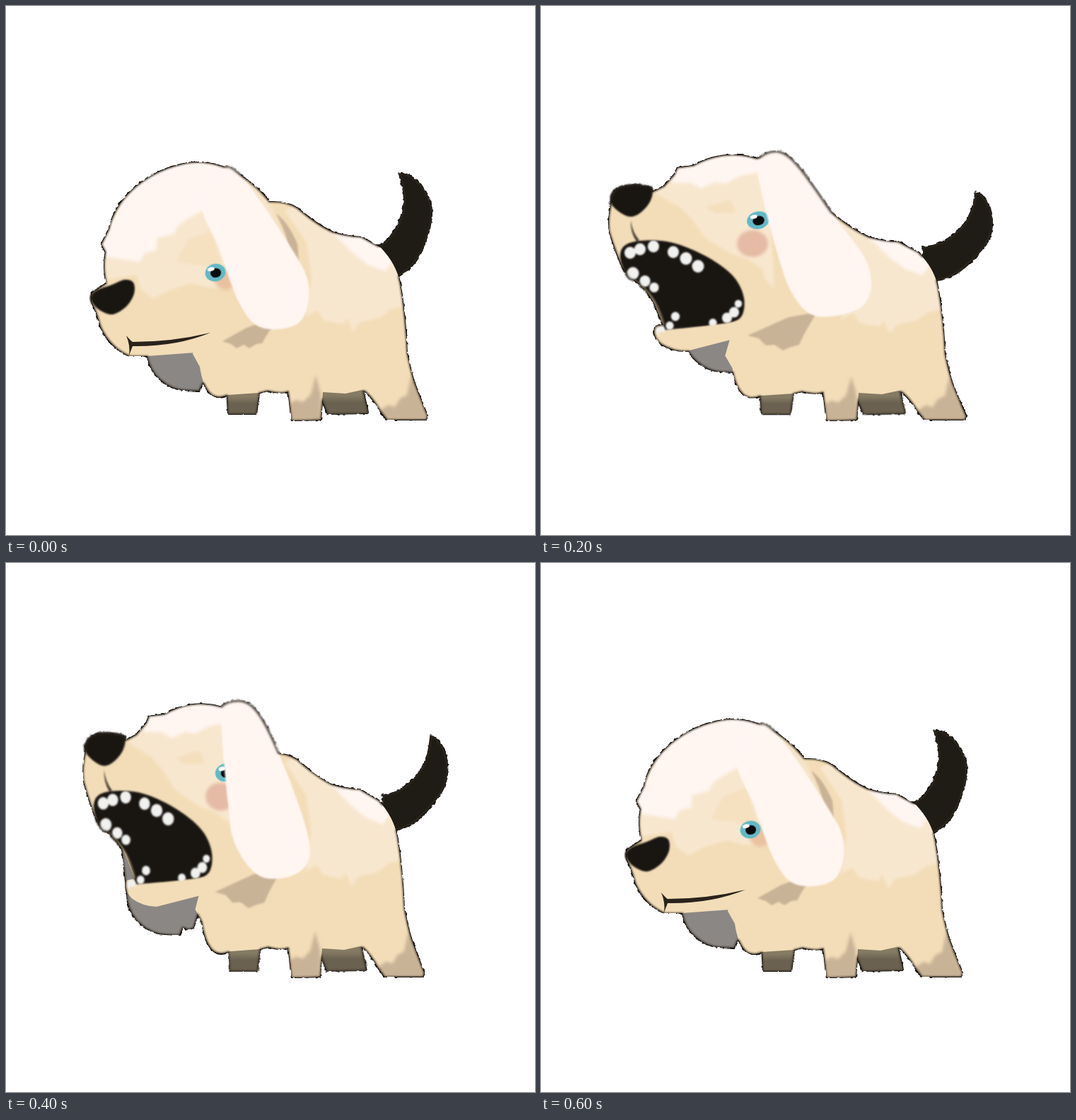
An HTML page for the animation above (650 ms loop, 748 by 748 pixels).

```html
<!DOCTYPE html>
<html lang="en">
<head>
<meta charset="utf-8">
<title>Barking puppy</title>
<style>
  html, body { margin: 0; width: 100%; height: 100%; overflow: hidden; background: #fff; }
  svg { display: block; width: 100vw; height: 100vh; }
</style>
</head>
<body>
<svg id="stage" viewBox="0 0 748 748" xmlns="http://www.w3.org/2000/svg"></svg>
<script>
const TAN = '#f3ddb8', CREAM = '#f8e7cf', WHITE = '#fff6f2', SHADE = '#c9b397', INK = '#191511';
const STEP = 50, STEPS = 13;

const nums = s => s.match(/-?[\d.]+/g).map(Number);

// Closed smooth curve through the points; a repeated point makes a corner.
function curve(list) {
  const v = nums(list), n = v.length / 2;
  const at = i => { const j = (i + n) % n; return [v[2 * j], v[2 * j + 1]]; };
  let d = 'M' + at(0);
  for (let i = 0; i < n; i++) {
    const [a, b, c, e] = [at(i - 1), at(i), at(i + 1), at(i + 2)];
    const h1 = b.map((q, k) => q + (c[k] - a[k]) / 6);
    const h2 = c.map((q, k) => q - (e[k] - b[k]) / 6);
    d += `C${h1} ${h2} ${c}`;
  }
  return d + 'Z';
}

const path = (d, fill, more = '') => `<path d="${d}" fill="${fill}" ${more}/>`;
const blob = (list, fill, more) => path(curve(list), fill, more);
const oval = (x, y, rx, ry, fill, more = '') =>
  `<ellipse cx="${x}" cy="${y}" rx="${rx}" ry="${ry}" fill="${fill}" ${more}/>`;
const teeth = list => {
  const v = nums(list);
  let out = '';
  for (let i = 0; i < v.length; i += 3) out += oval(v[i], v[i + 1], v[i + 2] * .95, v[i + 2], '#f1f1f0');
  return `<g filter="url(#soft1)">${out}</g>`;
};

// A filled shape with soft colour patches kept inside it.
const part = (id, d, fill, patches) =>
  `<clipPath id="clip-${id}"><path d="${d}"/></clipPath>${path(d, fill)}
   <g clip-path="url(#clip-${id})"><g filter="url(#soft2)">${patches}</g></g>`;

const eye = (x, y, rx, ry) => `<g transform="rotate(-12 ${x} ${y})" filter="url(#soft05)">
  ${oval(x, y, rx, ry, '#62b9c6')}${oval(x + .5, y + .5, rx * .52, 6.6, '#0b0b0b')}
  ${oval(x - 5, y - 6, 5, 2.8, '#fff')}</g>`;

const bodyShape = `M350 290L372 277Q398 276 412 286Q440 310 462 320Q482 326 503 327Q515 334 530 342
  Q552 365 557 392Q565 440 567 490Q572 515 577 532Q583 548 596 580L594 585L539 585L529 572
  Q520 556 508 545L503 543L480 548L448 546L445 585L404 586L401 560L399 545Q390 549 370 544L358 547
  L313 550Q300 556 290 549Q278 538 274 510L264 492L270 470L330 350Z`;

const tail = blob(`556,238 556,238 566,238 584,250 597,270 602,292 598,318 586,350 572,369 554,383
  554,383 536,362 526,341 526,341 542,328 555,307 562,285 562,262`, '#1f1c16');

const farLegs = path('M312 540L314 577L354 577L359 540Z', 'url(#leg)') +
  path('M444 536L448 560L455 577L512 576L511 570L503 536Z', 'url(#leg)');

const body = part('body', bodyShape, TAN,
  path(`M395 290L425 335L432 385L424 440L440 430L450 445L478 450L482 440L491 461L500 447L528 441
    L545 428L570 424L560 340L503 320L410 280Z`, CREAM) +
  path('M458 316L503 325L535 340L546 362L536 375L512 366L490 349Z', WHITE) +
  path('M438 522L445 548L446 588L402 588L400 563L410 557L420 560L431 549Z', SHADE) +
  path('M573 522L580 540L600 588L536 588L528 572L541 564L550 567L557 555L567 550Z', SHADE));

const backEar = path(`M165 365Q162 400 167 430L172 478Q176 498 190 510Q205 524 225 525L245 526
  L250 515L257 518L265 516L270 500L280 440Z`, '#8b8785');

const closedShape = `M376 281C350 248 315 222 272 221C225 222 160 255 146 315L135 337L141 348
  Q137 370 142 392L122 406L121 418Q128 432 134 454Q148 484 175 495L200 495L268 490Q335 480 370 455
  Q405 425 406 380Q408 340 385 297Z`;

const closedHead = part('closed', closedShape, TAN,
  path(`M135 345L215 325L285 268L310 250L330 400L285 398L262 392L230 402L208 414L190 400L185 380L135 388Z`, CREAM) +
  path('M240 362L258 330L290 318L310 380L275 366Z', '#f5e0bf') +
  path(`M330 215L372 277L400 340L340 300Z`, '#f6e4c9') +
  path(`M125 352L190 362L196 349L212 346L214 328L238 322L242 312L258 300L280 288L330 300L372 297
    L322 228L330 215L200 200Z`, WHITE)) +
  `<g filter="url(#soft1)">
    ${oval(311, 385, 17, 16, '#e4b591', 'opacity=".75" filter="url(#soft2)"')}
    ${path('M306 474L318 478L326 484L336 479L344 484L354 478L362 477L372 460L388 438L340 455Z', SHADE)}
    ${path('M382 294Q398 304 412 336Q416 365 410 396L402 394Q408 340 382 294Z', SHADE)}
    ${blob('120,411 128,402 150,394 168,387 180,391 181,407 170,425 151,436 134,431 123,421', INK)}
  </g>` + eye(296, 377, 14.5, 12.5);

const calmMouth = `<g id="calm" filter="url(#soft05)">
  ${path('M170 466Q176 473 179 475Q235 475 289 462Q240 482 179 481L174 494Q176 480 170 466Z', '#2a231c')}</g>`;

const snarlMouth = `<g id="snarl" transform="rotate(-2.2 296 377) translate(0 3)">
  <g filter="url(#soft1)">
    ${blob('155,475 155,475 180,466 204,452 220,436 240,419 265,409 290,407 303,417 304,432 290,443 250,455 210,468 172,475', INK)}
    ${path('M155 449Q162 461 175 467L166 470Q158 462 155 449Z', '#3a3127')}
  </g>
  ${teeth(`195 464 5 211 460 7 223 447 6 229 459 5 242 432 8.5 243 450 9 265 421 10
    263 443 8 279 428 4 291 418 9.5 284 438 9`)}</g>`;

const openShape = `M320 214L305 216Q280 208 255 212Q235 215 215 226L193 229L189 238L174 255L158 263
  L100 278Q94 300 97 320Q103 340 112 362Q118 378 140 393Q158 410 166 435L173 451L162 453Q156 466 170 478
  Q185 488 206 488L268 472Q330 482 385 435L365 320L345 240Z`;

const openHead = part('open', openShape, TAN,
  path(`M180 240L320 225L330 400L316 385L314 372L290 357L268 350L232 328L214 302L196 284L160 264Z`, CREAM) +
  path('M232 284L268 274L276 292L246 293Z', '#f3dfbd') +
  path(`M185 250L212 250L226 258L246 249L262 251L282 240L304 236L330 220L280 195L190 215Z`, WHITE) +
  oval(299, 336, 22, 19, '#e6bba5')) +
  `<g filter="url(#soft1)">
    ${path('M292 466L308 470L318 480L330 479L342 487L354 482L365 479L372 464L390 433L350 440Z', SHADE)}
    ${path('M127 303Q129 320 139 331L135 333Q126 320 127 303Z', '#4a4034')}
    ${blob('99,279 101,265 112,256 132,253 150,255 158,260 154,277 141,292 127,298 112,292', INK)}
    ${blob(`112,355 118,339 140,332 178,333 215,345 250,364 275,386 287,413 284,438 266,449 240,452
      174,458 174,458 170,442 156,410 140,393 120,378`, INK)}
    ${path('M140 394Q164 412 174 450', 'none', 'stroke="#76694f" stroke-width="2"')}
  </g>` +
  teeth(`126 349 8.5 140 344 8.5 159 340 8.5 187 348 8.5 205 357 9 222 368 9
    130 378 9 147 389 8 160 398 7 169 459 7 182 452 6 190 439 6.5`) +
  teeth('243 448 6 263 441 7.5 273 433 7.5 279 421 5.5') +
  path('M164 462Q215 456 284 445L268 470L210 484L175 476Z', TAN, 'filter="url(#soft1)"') +
  eye(307, 303, 16, 12.5);

const blur = (id, s) => `<filter id="${id}" x="-20%" y="-20%" width="140%" height="140%"
  color-interpolation-filters="sRGB"><feGaussianBlur stdDeviation="${s}"/></filter>`;

const stage = document.getElementById('stage');
stage.innerHTML = `<defs>
  ${blur('soft05', .6)}${blur('soft1', 1)}${blur('soft2', 2)}
  <linearGradient id="leg" x1="0" y1="0" x2="0" y2="1">
    <stop offset=".35" stop-color="#857b64"/><stop offset=".6" stop-color="#6a6150"/>
  </linearGradient>
  <filter id="edge" filterUnits="userSpaceOnUse" x="0" y="0" width="748" height="748"
    color-interpolation-filters="sRGB">
    <feMorphology in="SourceAlpha" operator="dilate" radius="1" result="wide"/>
    <feTurbulence type="fractalNoise" baseFrequency=".16" numOctaves="2" seed="4" result="noise"/>
    <feDisplacementMap in="wide" in2="noise" scale="4" xChannelSelector="R" yChannelSelector="G" result="rough"/>
    <feFlood flood-color="#17130f"/><feComposite in2="rough" operator="in" result="line"/>
    <feMorphology in="SourceAlpha" operator="erode" radius="1"/>
    <feGaussianBlur stdDeviation="1.2" result="core"/>
    <feFlood flood-color="#3a3024" flood-opacity=".75"/>
    <feComposite in2="SourceAlpha" operator="in"/>
    <feComposite in2="core" operator="out" result="rim"/>
    <feMerge><feMergeNode in="line"/><feMergeNode in="SourceGraphic"/><feMergeNode in="rim"/></feMerge>
  </filter></defs>
  <g filter="url(#edge)">
    <g id="rear"><g id="tail">${tail}</g>${farLegs}</g>
    <g id="backEar" filter="url(#soft05)">${backEar}</g>
    <g id="body">${body}</g>
    <g id="closed">${closedHead}${calmMouth}${snarlMouth}</g>
    <g id="open">${openHead}</g>
    <path id="ear" fill="${WHITE}" filter="url(#soft1)"/>
  </g>`;

// One key every two steps; the last key equals the first.
const still = '1 0 0 1 0 0';
const keys = {
  squash: ['0', '.012', '.026', '0', '-.025', '-.011', '0'],
  wag: ['0', '9', '26', '35', '24', '8', '0'],
  backEar: ['28 18', '37 1', '30 -8', '12 -11', '0 0', '6 17', '28 18'],
  closed: [still, '.999 .038 -.038 .999 14.6 -13.9', '.996 .087 -.087 .996 30.9 -36.4',
    still, still, '1 .026 -.026 1 11.8 -15.7', still],
  open: [still, still, still, '.964 .0245 -.031 1.022 23 -26.2',
    '.957 .023 -.008 1.0385 19.7 -25.5', '.957 .023 -.008 1.0385 19.7 -17', still],
  ear: [
    '300,235 277,282 300,340 330,420 362,455 415,447 428,395 400,337 330,238',
    '298,232 285,275 310,345 342,412 380,446 440,431 444,375 412,318 335,242',
    '308,216 310,255 333,345 356,408 392,439 456,423 463,368 415,298 350,213',
    '313,206 313,245 324,340 340,408 374,442 433,430 443,382 400,280 352,203',
    '306,202 305,240 314,340 325,400 362,444 416,436 428,390 386,270 347,202',
    '296,232 284,285 292,350 308,428 355,461 400,446 407,396 370,310 325,235'
  ]
};
keys.ear.push(keys.ear[0]);

function pose(name, step) {
  const i = step >> 1, f = (step % 2) / 2;
  const a = nums(keys[name][i]);
  if (!f) return a;
  const b = nums(keys[name][i + 1]);
  return a.map((v, k) => v + (b[k] - v) * f);
}

const el = id => document.getElementById(id);
const move = (id, t) => el(id).setAttribute('transform', t);
const show = (id, on) => el(id).setAttribute('display', on ? 'inline' : 'none');

function draw(step) {
  const [k] = pose('squash', step);
  const stretch = `translate(405 585) scale(${1 + k} ${1 - k}) translate(-405 -585)`;
  move('rear', stretch);
  move('body', stretch);
  move('tail', `rotate(${pose('wag', step)} 545 362)`);
  move('backEar', `translate(${pose('backEar', step)})`);
  move('closed', `matrix(${pose('closed', step)})`);
  move('open', `matrix(${pose('open', step)})`);
  el('ear').setAttribute('d', curve(pose('ear', step).join(' ')));

  const barking = step >= 4 && step <= 9;
  const calm = step < 2 || step === 12;
  show('open', barking);
  show('closed', !barking);
  show('calm', calm);
  show('snarl', !calm);
}

const start = performance.now();
let last = -1;
function tick() {
  const step = Math.floor((performance.now() - start) / STEP) % STEPS;
  if (step !== last) draw(last = step);
  requestAnimationFrame(tick);
}
tick();
</script>
</body>
</html>
```
